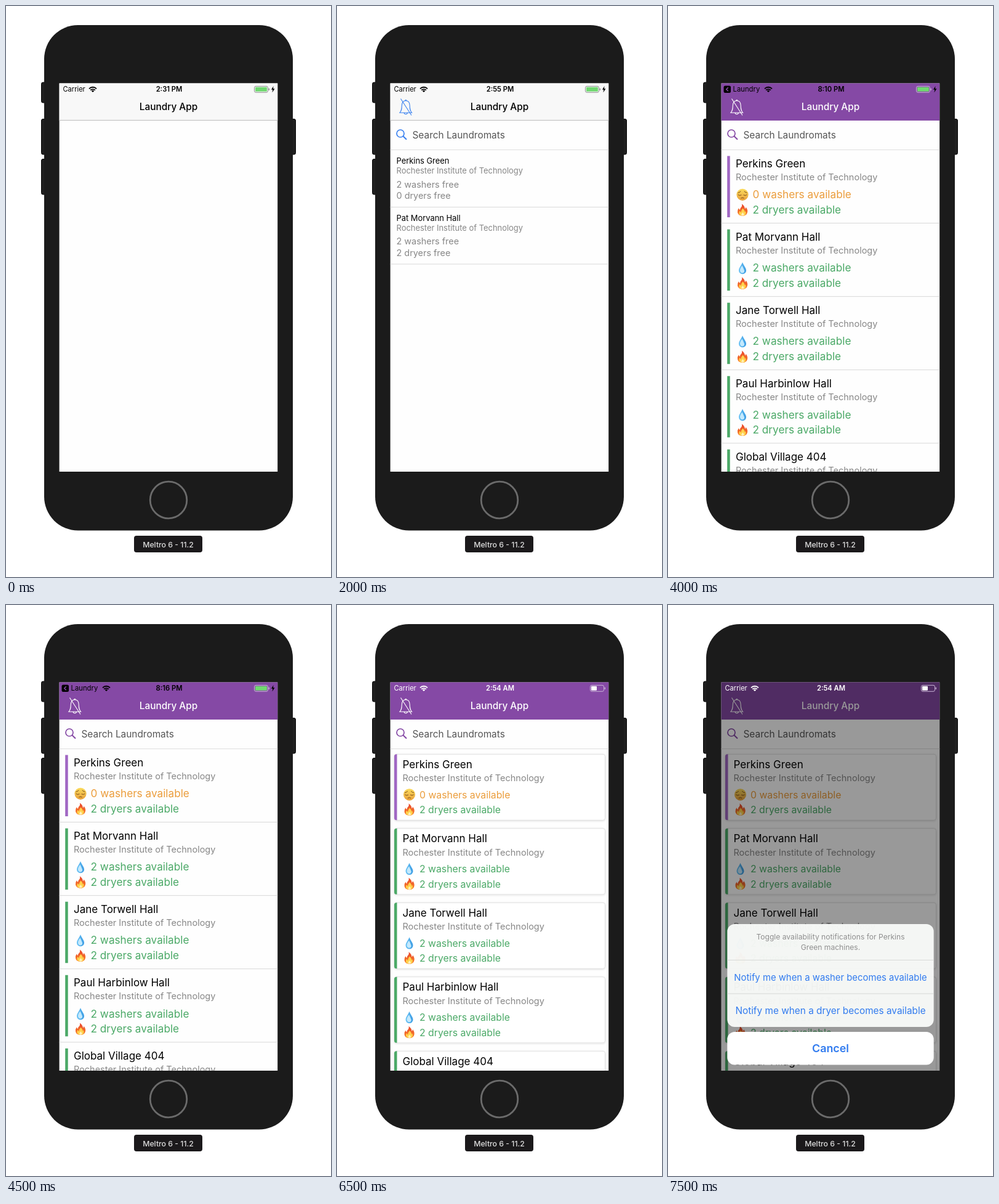
An HTML page for the animation above (8000 ms loop, 528 by 927 pixels).

```html
<!DOCTYPE html>
<html lang="en">
<head>
<meta charset="utf-8">
<title>Laundry App</title>
<style>
  html, body { margin: 0; width: 100%; height: 100%; overflow: hidden; background: #fff; }
  svg { display: block; width: 528px; height: 927px; font-family: Inter, Roboto, sans-serif; }
</style>
</head>
<body>
<svg viewBox="0 0 528 927">
  <defs>
    <clipPath id="screen"><rect x="86.600" y="125.400" width="354.600" height="630.600"/></clipPath>
    <filter id="shadow" x="-5%" y="-10%" width="110%" height="125%">
      <feDropShadow dx="0" dy=".8" stdDeviation="1.600" flood-opacity=".14"/>
    </filter>
    <linearGradient id="skin" x2="0" y2="1"><stop stop-color="#fbdc5c"/><stop offset="1" stop-color="#e8a03a"/></linearGradient>
    <linearGradient id="water"><stop stop-color="#6cc4f5"/><stop offset="1" stop-color="#3a9be3"/></linearGradient>
    <linearGradient id="heat" x2="0" y2="1"><stop stop-color="#e8432c"/><stop offset="1" stop-color="#f98526"/></linearGradient>
    <g id="sad">
      <circle r="9.600" fill="url(#skin)"/>
      <path d="M-7-3q2-.4 4-2.300M7-3q-2-.4-4-2.300M-7 .3q2.300 2 5 .3M7 .3q-2.300 2-5 .3M-2.300 5.600q2.300-1.600 4.600 0" fill="none" stroke="#7a4a18" stroke-linecap="round"/>
    </g>
    <g id="drop">
      <path d="M0-9.500C2-4 6-.5 6 4a6 5.800 0 0 1-12 0C-6-.5-2-4 0-9.500Z" fill="url(#water)"/>
      <path d="M-.5-4Q-4.500 1-4 4.500Q-3 8 0 8Q3.500 7.500 3 4Q2 1-.5-4Z" fill="#c3e9fd"/>
    </g>
    <g id="fire">
      <path d="M-1-9.800Q4-6 4-1.500Q5.500-2.500 5.500-4.500Q9 0 8 4Q6.500 9.800 0 9.800Q-7 9.500-8 4Q-8.500 0-6-3Q-5.800-1-4.200 0Q-4-3-1.500-5Q-.2-7-1-9.800Z" fill="url(#heat)"/>
      <path d="M.5-2.500Q4 1 3.500 3.500Q5 3 5 1.500Q7 9.500 0 9.500Q-6 9-5.500 4.500Q-5.300 2.500-4 1.500Q-3.800 3.500-2.500 4Q-2 0 .5-2.500Z" fill="#ffd34d"/>
      <path d="M.5 4Q5 9.400 0 9.400Q-4 9 .5 4Z" fill="#fff1b8"/>
    </g>
  </defs>
  <g fill="#202020" stroke="#000">
    <rect x="57.500" y="124" width="8" height="33" rx="2.500"/>
    <rect x="57.500" y="183.500" width="8" height="57.500" rx="2.500"/>
    <rect x="57.500" y="248.500" width="8" height="57.500" rx="2.500"/>
    <rect x="462.500" y="183.500" width="8" height="57.500" rx="2.500"/>
  </g>
  <rect x="62" y="31" width="404" height="820.500" rx="55" fill="#1b1b1b"/>
  <circle cx="264" cy="802" r="29.800" fill="none" stroke="#6b6b6b" stroke-width="2.800"/>
  <rect x="208" y="860" width="111" height="27" rx="4" fill="#1b191b"/>
  <text x="263.500" y="879" font-size="12.300" font-weight="500" fill="#dedede" text-anchor="middle">Meltro 6 - 11.2</text>
  <g id="app" clip-path="url(#screen)"></g>
</svg>
<script>
const halls = ['Perkins Green', 'Pat Morvann Hall', 'Jane Torwell Hall', 'Paul Harbinlow Hall', 'Global Village 404', 'Colony Manor'];
const school = 'Rochester Institute of Technology';
const GREY = '#878787', GREEN = '#4ba967', ORANGE = '#eb9d3c', RED = '#f18a86';

const light = { bar: '#f8f8f8', title: '#000', status: '#000', tint: '#3b82f0', icon: '#3b82f0', edge: '#8b8b8b' };
const dark = { bar: '#662d87', title: '#fff', status: '#fff', tint: '#662d87', icon: '#fff', edge: '#c9b5d6' };
const purple = { ...dark, bar: '#8549a5', tint: '#8549a5' };
const purpleInk = { ...purple, status: '#000' };

// y: baselines of the four text lines in the first row
const small = { x: 96.5, y: [256, 272, 294.7, 313], size: [12.9, 12.95, 14.4, 14.4], pitch: 92.5, line: 326.5, rows: 2 };
const large = { x: 96.5, y: [259.8, 278, 296.6, 321.7], size: [16, 14.5, 14.4, 16], pitch: 101.6, line: 335.2, rows: 6 };
const barred = { x: 110, y: [261.5, 282.5, 312.3, 337], size: [17, 14.5, 17.2, 17.2], pitch: 119.1, line: 352.5, rows: 5, bar: [96.2, 243.5, 99.5], emoji: true };
const cards = { x: 108.5, y: [266.7, 288, 317.4, 344], size: [17, 14.5, 17.2, 17.2], pitch: 125.2, rows: 5, card: [94.8, 244.5, 338.7, 108, 9], emoji: true };
const raised = { x: 106.5, y: [264.8, 286, 313.8, 338], size: [17, 14.5, 15.8, 15.8], pitch: 120.5, rows: 5, card: [93, 242.3, 342.5, 107, 3.5], emoji: true, shadow: true };

const bell = true, search = true, back = true, low = true, sheet = true;
const scenes = [
  { time: '2:31 PM', theme: light },
  { time: '2:38 PM', theme: light, list: { ...small, line: 0 }, lift: 47.5 },
  { time: '2:44 PM', theme: light, list: { ...small, line: 0 }, search },
  { time: '2:50 PM', theme: light, list: small, search },
  { time: '2:55 PM', theme: light, list: small, search, bell },
  { time: '6:48 PM', theme: light, list: large, search, bell },
  { time: '7:25 PM', theme: dark, list: large, search, bell, back },
  { time: '7:42 PM', theme: purple, list: large, search, bell, back },
  { time: '8:10 PM', theme: purpleInk, list: barred, search, bell, back },
  { time: '8:16 PM', theme: purpleInk, list: barred, search, bell, back },
  { time: '10:52 PM', theme: purple, list: cards, search, bell },
  { time: '11:04 PM', theme: purple, list: cards, search, bell },
  { time: '2:54 AM', theme: purple, list: raised, search, bell, low },
  { time: '2:54 AM', theme: purple, list: raised, search, bell, low },
  { time: '2:54 AM', theme: purple, list: raised, search, bell, low, sheet },
  { time: '2:54 AM', theme: purple, list: raised, search, bell, low, sheet }
];

const text = (x, y, size, fill, str, more = '') =>
  `<text x="${x}" y="${y}" font-size="${size}" fill="${fill}" ${more}>${str}</text>`;
const centred = (y, size, fill, str, weight = 400) =>
  text(264, y, size, fill, str, `text-anchor="middle" font-weight="${weight}"`);
const rect = (x, y, w, h, fill, more = '') =>
  `<rect x="${x}" y="${y}" width="${w}" height="${h}" fill="${fill}" ${more}/>`;
const line = (y, colour = '#d9d9d9', x = 86, w = 356) => rect(x, y - .5, w, 1, colour);
const stroke = (d, colour, width) =>
  `<path d="${d}" fill="none" stroke="${colour}" stroke-width="${width}"/>`;
const emoji = (id, x, y) => `<use href="#${id}" x="${x}" y="${y}"/>`;

function row(list, i) {
  const { x, y, size, card, bar } = list;
  const busy = list.emoji && i === 0;
  const mark = busy ? '#a067c3' : GREEN;
  let out = '';
  if (card) {
    const [cx, cy, w, h, r] = card;
    out += rect(cx, cy, w, h, '#fff', `rx="${r}" stroke="#e0e0e0" ${list.shadow ? 'filter="url(#shadow)"' : ''}`);
    out += `<path d="M${cx + 4.5} ${cy}v${h}h${r - 4.5}a${r} ${r} 0 0 1 ${-r} ${-r}v${2 * r - h}a${r} ${r} 0 0 1 ${r} ${-r}z" fill="${mark}"/>`;
  }
  if (bar) out += rect(bar[0], bar[1], 4.5, bar[2], mark);
  if (list.line) out += line(list.line);
  out += text(x, y[0], size[0], '#000', halls[i]) + text(x, y[1], size[1], GREY, school);
  if (list.emoji) {
    out += emoji(busy ? 'sad' : 'drop', x + 11, y[2] - 6) + emoji('fire', x + 11, y[3] - 6);
    out += text(x + 27.5, y[2], size[2], busy ? ORANGE : GREEN, `${busy ? 0 : 2} washers available`);
    out += text(x + 27.5, y[3], size[3], GREEN, '2 dryers available');
  } else {
    const few = list.rows === 2;
    out += text(x, y[2], size[2], few ? GREY : RED, `${few ? 2 : 0} washers free`);
    out += text(x, y[3], size[3], few ? GREY : '#000', `${few && i ? 2 : 0} dryers free`);
  }
  return `<g transform="translate(0 ${list.pitch * i})">${out}</g>`;
}

function battery({ low, theme }) {
  const x = low ? 411.5 : 403.5;
  return rect(x, 130.3, 22, 10, 'none', `rx="2.500" stroke="${theme.edge}"`) +
    rect(x + 23.2, 133.6, 1.3, 3.4, theme.edge, 'rx=".6"') +
    rect(x + 1.5, 131.8, low ? 9 : 19, 7, low ? theme.status : '#70d870', 'rx="1"') +
    (low ? '' : `<path d="M434.500 130l-3.500 5.800h2.300l-.8 4.700 4-6.200h-2.500z" fill="${theme.status}"/>`);
}

function statusBar(s) {
  const c = s.theme.status, wifi = s.back ? 163 : 141;
  const label = s.back
    ? rect(90.5, 129.5, 11.5, 11.5, c, 'rx="2.500"') + stroke('M97.800 132.200l-3 3 3 3', s.theme.bar, 1.6) + text(105.5, 139.3, 11.3, c, 'Laundry')
    : text(92.5, 139.3, 11.1, c, 'Carrier');
  return label +
    `<g transform="translate(${wifi} 139.500)">` +
    stroke('M-6-5.200a8.500 8.500 0 0 1 12 0M-3.800-2.800a5.400 5.400 0 0 1 7.600 0', c, 1.9) +
    `<path d="M0 .6l-2.200-2.200a3.100 3.100 0 0 1 4.400 0z" fill="${c}"/></g>` +
    text(265, 139.3, 11.2, c, s.time, 'text-anchor="middle" font-weight="600"') + battery(s);
}

const bellIcon = c => stroke('M102 173.200H121.500C118.500 170 118.300 167 118.200 161.500C118 156 115.500 153.700 111.700 153.700S105.500 156 105.300 161.500C105.200 167 105 170 102 173.200ZM110.300 153.700a1.500 1.500 0 0 1 2.900 0M109 173.500a2.800 2.800 0 0 0 5.500 0M103.500 150.500L121 177.500', c, 1.1);

const searchBar = c => `<circle cx="103" cy="207" r="6" fill="none" stroke="${c}" stroke-width="1.700"/>` +
  stroke('M107.300 211.300L113 216.800', c, 2) + text(122.5, 214.5, 15.4, '#555', 'Search Laundromats') + line(233.5, '#dedede');

function actionSheet() {
  const blue = '#317bef';
  return rect(96.3, 518, 335.4, 167, '#f8faf8', 'rx="12" fill-opacity=".96"') +
    centred(543.3, 12.1, '#8f8f8f', 'Toggle availability notifications for Perkins') +
    centred(560, 12.1, '#8f8f8f', 'Green machines.') +
    line(576.5, '#d8dad8', 96.3, 335.4) + line(631, '#d8dad8', 96.3, 335.4) +
    centred(609.5, 14.85, blue, 'Notify me when a washer becomes available') +
    centred(664, 15.35, blue, 'Notify me when a dryer becomes available') +
    rect(96.3, 693, 335.4, 53.5, '#fff', 'rx="12"') + centred(726.2, 17.9, blue, 'Cancel', 600);
}

function draw(s) {
  const { theme, list } = s;
  let out = rect(86, 125, 356, 631, '#fefefe');
  if (list) {
    const rows = halls.slice(0, list.rows).map((_, i) => row(list, i)).join('');
    out += `<g transform="translate(0 ${-(s.lift || 0)})">${rows}</g>`;
  }
  out += rect(86, 125, 356, 61, theme.bar) + centred(168.8, 15.4, theme.title, 'Laundry App', 500);
  if (theme === light) out += line(185.5, '#bcbcbc');
  if (s.search) out += searchBar(theme.tint);
  if (s.bell) out += bellIcon(theme.icon);
  if (s.sheet) out += rect(86, 125, 356, 631, '#000', 'fill-opacity=".4"') + actionSheet();
  return out + statusBar(s);
}

const app = document.getElementById('app');
let shown = -1;
function tick() {
  const index = Math.floor(performance.now() % 8000 / 500);
  if (index !== shown) app.innerHTML = draw(scenes[shown = index]);
  requestAnimationFrame(tick);
}
tick();
</script>
</body>
</html>
```
